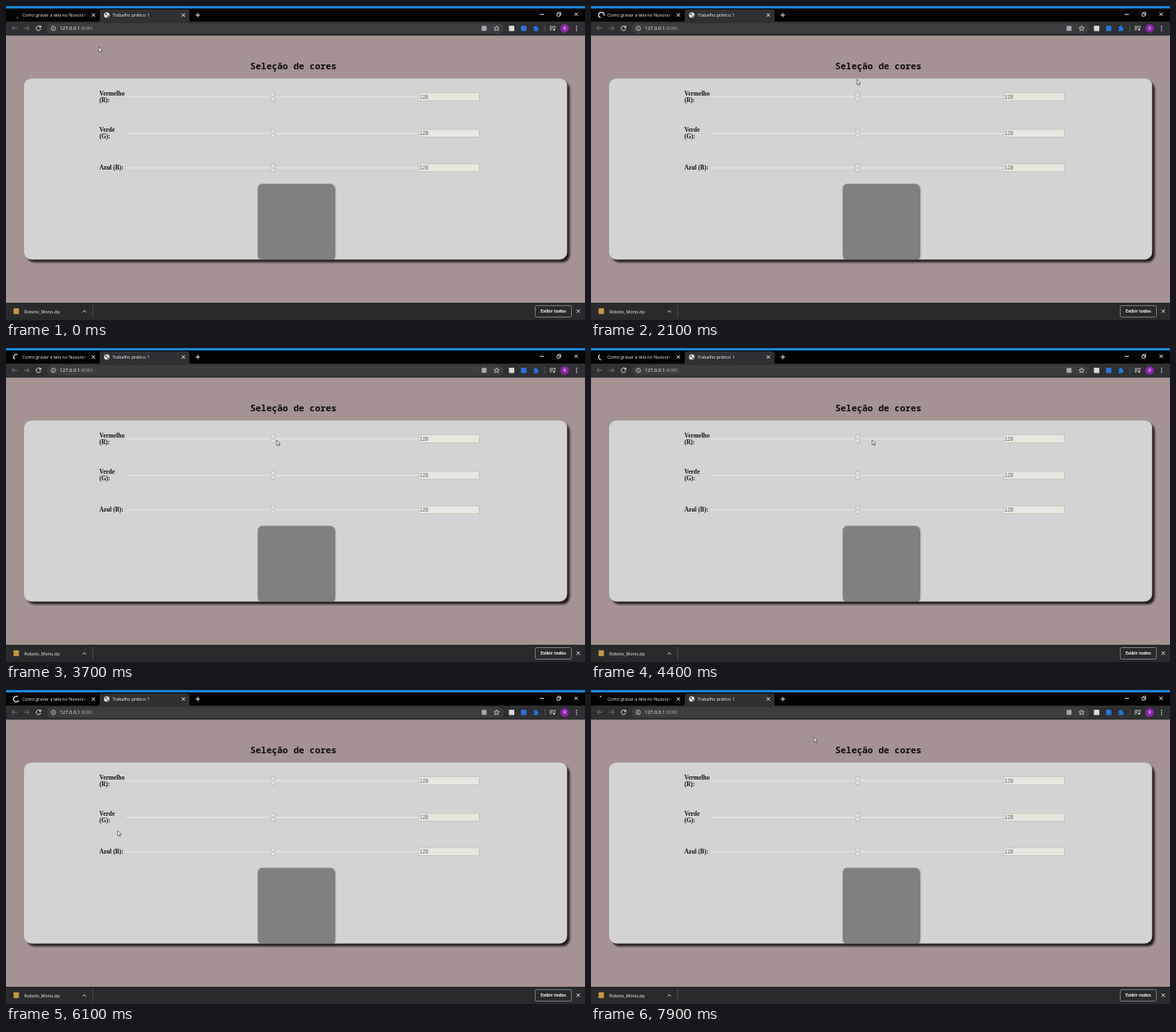
Animation, 704 px wide and 382 px high, one loop 8000 ms. Source, as an HTML page:

```html
<!DOCTYPE html>
<html lang="pt-BR">
<head>
<meta charset="utf-8">
<title>Seleção de cores</title>
<style>
  html, body { margin: 0; width: 100%; height: 100%; overflow: hidden; background: #a59393; }
  svg { display: block; width: 704px; height: 382px; }
  .ui { font-family: "Open Sans", "Noto Sans", sans-serif; font-size: 5.35px; font-weight: 500; fill: #f6f6f6; }
  .label { font: bold 7.45px "Liberation Serif", "Times New Roman", serif; fill: #111; }
  .value { font: 6.3px "Liberation Sans", Arial, sans-serif; fill: #666; }
  .title { font: bold 10.93px "Noto Sans Mono", "DejaVu Sans Mono", monospace; fill: #0b0909; }
  .line { fill: none; stroke: #e8e8e8; stroke-width: 1; }
  .dim { stroke: #77787b; }
</style>
</head>
<body>
<svg viewBox="0 0 704 382" xmlns="http://www.w3.org/2000/svg">
  <defs>
    <linearGradient id="fade" gradientUnits="userSpaceOnUse" x1="92" x2="99" y1="0" y2="0">
      <stop stop-color="#f6f6f6"/><stop offset="1" stop-color="#f6f6f6" stop-opacity="0"/>
    </linearGradient>
    <filter id="blur" x="-10%" y="-10%" width="120%" height="120%"><feGaussianBlur stdDeviation="1.3"/></filter>
    <filter id="soft" x="-10%" y="-10%" width="120%" height="120%"><feGaussianBlur stdDeviation=".8"/></filter>
    <path id="cross" d="M-2-2 2 2M2-2-2 2"/>
  </defs>

  <!-- tab strip -->
  <rect width="704" height="20" fill="#020203"/>
  <rect width="704" height="3" fill="#1b83d2"/>
  <path d="M111 19.500q3 0 3-3V7q0-3 3-3h103q3 0 3 3v9.500q0 3 3 3z" fill="#2f3032"/>
  <path id="spinner" fill="none" stroke="#e8eef4" stroke-width="1.200"/>
  <text class="ui" x="20" y="13" style="fill:url(#fade)">Como gravar a tela no Nuvoram</text>
  <circle cx="122.500" cy="11" r="3.300" fill="#e8e8e8"/>
  <path d="M120 9.500l2-.8 1 1.200-1.500 1.300zM122.500 12l2-.6.6 1.200-1.600 1.200z" fill="#434447"/>
  <text class="ui" x="129.500" y="13">Trabalho prático 1</text>
  <g class="line">
    <use href="#cross" x="106.300" y="11"/>
    <use href="#cross" x="215.600" y="11"/>
    <path d="M230.500 11h5.400M233.200 8.300v5.400"/>
    <path d="M649 10.200h5"/>
    <path d="M670 9h3.300v3.300H670zM671.200 9V7.800h3.300v3.300h-1.200" stroke-width=".8"/>
    <use href="#cross" x="693.300" y="10"/>
  </g>

  <!-- toolbar -->
  <rect y="19" width="704" height="17.300" fill="#2f3032"/>
  <rect x="49.500" y="20.800" width="556" height="12.800" rx="6.400" fill="#3c3d3f"/>
  <g class="line">
    <path class="dim" d="M13.500 27H7.500M10 24.300 7.300 27l2.700 2.700M22 27h6M25.500 24.300l2.700 2.700-2.700 2.700"/>
    <path d="M41.800 25.300a2.800 2.800 0 1 0 .5 2.500M42.300 24v2.100h-2.200"/>
    <circle cx="57.600" cy="27.200" r="2.600" stroke-width=".7"/>
    <path d="M57.600 26.800v1.800M57.600 25.500v.6" stroke-width=".7"/>
    <path d="M596.500 24l.9 2.100 2.300.2-1.800 1.500.6 2.200-2-1.200-2 1.200.6-2.200-1.800-1.500 2.300-.2z" stroke-width=".7"/>
    <path d="M655.200 23v8" stroke="#6a6b6e" stroke-width=".6"/>
    <path d="M661 25h5M661 27h4M661 29h2.500M667 24.500v4.500M667 24.700h1.500" stroke-width=".8"/>
  </g>
  <circle cx="666.300" cy="29" r="1.100" fill="#e8e8e8"/>
  <text class="ui" x="65.300" y="29.400" style="font-size:5.900px">127.0.0.1<tspan fill="#a4a6a9">:8080</tspan></text>
  <rect x="578.300" y="24.200" width="6" height="6" rx=".6" fill="#a6a8ac"/>
  <rect x="611.500" y="24" width="6.500" height="6.500" rx=".6" fill="#dcd8d8"/>
  <rect x="626.200" y="24" width="6.500" height="6.500" rx=".8" fill="#2a74e0"/>
  <path d="M641.300 25.200h1.600a1.100 1.100 0 0 1 2.200 0h1.500v1.700a1.100 1.100 0 0 1 0 2.200v1.500h-5.300v-1.700a1 1 0 0 0 0-2z" fill="#2475df"/>
  <circle cx="679.200" cy="27.200" r="5.200" fill="#8e24aa"/>
  <text class="ui" x="679.200" y="29.300" text-anchor="middle" style="font-size:5.800px">R</text>
  <g fill="#e8e8e8"><circle cx="693.700" cy="24.700" r=".75"/><circle cx="693.700" cy="27.200" r=".75"/><circle cx="693.700" cy="29.700" r=".75"/></g>

  <!-- page -->
  <rect y="36.300" width="704" height="325" fill="#a59393"/>
  <text class="title" x="297" y="77.300">Seleção de cores</text>
  <rect x="25.500" y="91.800" width="660" height="220" rx="9" fill="#171313" fill-opacity=".9" filter="url(#blur)"/>
  <rect x="22" y="88.200" width="660.300" height="220.300" rx="9" fill="#d3d3d3"/>
  <g id="rows"></g>
  <rect x="307.200" y="217.700" width="92.700" height="91.300" rx="5" fill="#222" fill-opacity=".8" filter="url(#soft)"/>
  <rect x="306.200" y="216.500" width="92.800" height="92" rx="5" fill="#808080"/>

  <!-- download shelf -->
  <rect y="361" width="704" height="21" fill="#292a2c"/>
  <rect x="9.200" y="367.800" width="6.500" height="7" rx=".5" fill="#c59a44"/>
  <text class="ui" x="22.300" y="373.600" style="font-size:5.300px">Roboto_Mono.zip</text>
  <g class="line">
    <path d="M93.200 372.600l2-2 2 2"/>
    <path d="M105.500 364v15" stroke="#55565a" stroke-width=".7"/>
    <rect x="643.500" y="364.500" width="44" height="14" rx="1.800" stroke="#8c8d90" stroke-width=".8"/>
    <use href="#cross" x="695.800" y="371.300"/>
  </g>
  <text class="ui" x="665.500" y="373.300" text-anchor="middle" style="font-size:5.250px;font-weight:bold">Exibir todos</text>

  <path id="cursor" d="M0 0v6.300l1.450-1.300 1 2.300 1.100-.45-1-2.300h1.950z" fill="#f4f4f4" stroke="#333" stroke-width=".6"/>
</svg>
<script>
const LOOP = 8000, STEP = 100;

// label lines, row centre
const rows = [
  [["Vermelho", "(R):"], 110.4],
  [["Verde", "(G):"], 154.9],
  [["Azul (B):"], 196.8]
];

// time, x, y of the pointer tip
const path = [
  [0, 112.8, 49.8], [900, 112.8, 49.8], [1500, 130, 50], [1800, 134, 48],
  [2000, 295, 82], [2100, 323.4, 89.3], [2600, 322, 91], [2800, 318, 98],
  [3100, 304.8, 108], [3500, 328, 117], [3700, 329, 112], [4000, 507, 108],
  [4200, 420, 117], [4400, 341.8, 111.6], [4500, 345, 117], [4700, 396, 180],
  [5000, 330, 305], [5400, 246, 302], [5600, 240, 303], [6100, 135.7, 171],
  [6300, 142, 161], [6700, 250, 148], [7200, 354.8, 137.6], [7400, 357, 207],
  [7700, 312, 120], [7900, 271, 57.3]
];

const byId = id => document.getElementById(id);

byId("rows").innerHTML = rows.map(([lines, y]) => {
  const first = lines.length > 1 ? y - 1.9 : y + 2.4;
  const label = lines.map((s, i) =>
    `<text class="label" x="113.500" y="${first + i * 8.4}">${s}</text>`).join("");
  return `${label}
    <rect x="146" y="${y - 1}" width="356" height="2" rx="1" fill="#dfdfde"/>
    <rect x="322" y="${y - 4.6}" width="4.800" height="9.200" rx=".8" fill="#e9e7e4" stroke="#aaa6a2" stroke-width=".6"/>
    <path d="M323.300 ${y - .8}h2.200M323.300 ${y + .8}h2.200" stroke="#999" stroke-width=".6"/>
    <rect x="502" y="${y - 4.8}" width="73.300" height="9.600" fill="#e8e8e1" stroke="#b8b8b0" stroke-width=".6"/>
    <text class="value" x="503" y="${y + 2.1}">128</text>`;
}).join("");

function pointer(t) {
  const i = path.findIndex(k => k[0] > t);
  if (i < 0) return path[path.length - 1].slice(1);
  const [t0, x0, y0] = path[i - 1], [t1, x1, y1] = path[i];
  const p = (t - t0) / (t1 - t0);
  return [x0 + (x1 - x0) * p, y0 + (y1 - y0) * p];
}

// cubic-bezier(.4, 0, .2, 1)
function ease(x) {
  let lo = 0, hi = 1, s = .5;
  for (let i = 0; i < 20; i++) {
    s = (lo + hi) / 2;
    const bx = 1.2 * s * (1 - s) ** 2 + .6 * s * s * (1 - s) + s ** 3;
    if (bx < x) lo = s; else hi = s;
  }
  return 3 * s * s - 2 * s ** 3;
}

// the arc shrinks towards its start, then grows out of it
function arc(t) {
  const e = t - 2160, turn = Math.floor(e / 1333), p = (e / 1333 - turn) * 2;
  const start = 30 + e * 360 / 1568 + turn * 270;
  const sweep = p < 1 ? Math.min(-14, 270 * ease(p) - 270) : Math.max(14, 270 * ease(p - 1));
  const at = deg => {
    const a = deg * Math.PI / 180;
    return `${12.6 + 3.3 * Math.cos(a)} ${11 + 3.3 * Math.sin(a)}`;
  };
  return `M${at(start)}A3.3 3.3 0 ${+(Math.abs(sweep) > 180)} ${+(sweep > 0)} ${at(start + sweep)}`;
}

const cursor = byId("cursor"), spinner = byId("spinner");
const origin = performance.now();

function draw(now) {
  const t = Math.floor(Math.max(0, now - origin) % LOOP / STEP) * STEP;
  cursor.setAttribute("transform", `translate(${pointer(t)})`);
  spinner.setAttribute("d", arc(t));
  requestAnimationFrame(draw);
}
draw(origin);
</script>
</body>
</html>
```
